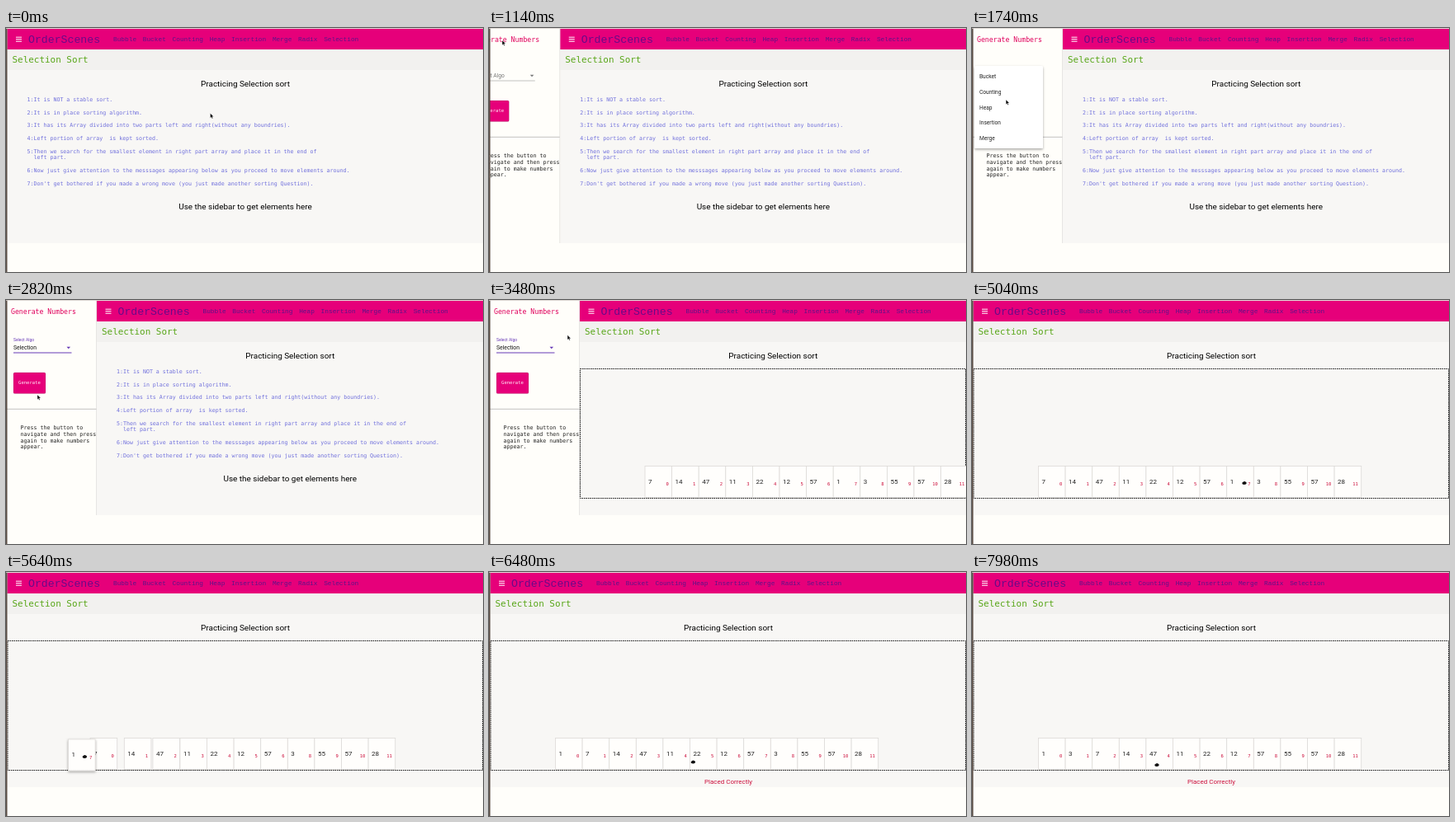
Write an HTML page that moves like this. It is 578x296 px and loops after 8000 ms.

```html
<!DOCTYPE html>
<html lang="en">
<head>
<meta charset="utf-8">
<title>Selection Sort</title>
<style>
html, body { margin: 0; width: 100%; height: 100%; overflow: hidden; background: #fffefa; }
svg { display: block; width: 578px; height: 296px; }
text { white-space: pre; }
.ui { font-family: Roboto, sans-serif; }
.mono { font-family: "DejaVu Sans Mono", monospace; }
.bar { font-family: "Liberation Mono", monospace; }
</style>
</head>
<body>
<svg id="stage" viewBox="0 0 578 296"></svg>
<script>
const LOOP = 8000, SIDE = 108.5, CELL = 32.6, ROW = 80.5, SETTLE = 250;
const PINK = '#e6007a', PURPLE = '#673ab7', RED = '#cc0f3c';
const MENU_OPEN = 1022, MENU_CLOSE = 3700, SELECT = 1480, PICK = 2020, GENERATE = 3180;
const values = [7, 14, 47, 11, 22, 12, 57, 1, 3, 55, 57, 28];
const names = ['Bubble', 'Bucket', 'Counting', 'Heap', 'Insertion', 'Merge', 'Radix', 'Selection'];
const drags = [
  { from: 7, to: 0, t0: 5160, t1: 5620 },
  { from: 8, to: 1, t0: 6840, t1: 7300 }
];
// time, x, y of the pointer
const path = [
  [0, 247.5, 103.5], [330, 247.5, 103.5], [960, 15, 14], [1150, 16, 15], [1450, 45, 57],
  [1580, 45, 58], [1960, 35, 133], [2260, 35, 133], [2820, 38, 115], [3060, 34, 103],
  [3220, 34, 103], [3640, 124, 14], [3720, 124, 14], [3900, 134, 41.5], [4500, 322, 196],
  [4780, 322, 196], [5040, 330, 222], [5160, 330, 222], [5620, 95, 224], [6360, 247, 230.5],
  [6470, 247, 230.5], [6800, 352, 228], [6840, 352, 228], [7300, 128, 230], [7360, 128, 230],
  [7980, 224, 234], [8000, 224, 234]
];

const clamp = p => Math.max(0, Math.min(1, p));
const smooth = p => p * p * (3 - 2 * p);
// cubic-bezier(.25, .8, .25, 1)
function ease(p) {
  p = clamp(p);
  let lo = 0, hi = 1;
  for (let i = 0; i < 20; i++) {
    const u = (lo + hi) / 2;
    if (.75 * u * (1 - u) + u ** 3 < p) lo = u; else hi = u;
  }
  return 2.4 * lo * (1 - lo) ** 2 + 3 * (1 - lo) * lo * lo + lo ** 3;
}

const text = (x, y, size, fill, str, cls = 'mono', more = '') =>
  `<text x="${x}" y="${y}" font-size="${size}" fill="${fill}" class="${cls}" ${more}>${str}</text>`;
const rect = (x, y, w, h, fill, more = '') =>
  `<rect x="${x}" y="${y}" width="${w}" height="${h}" fill="${fill}" ${more}/>`;
const mid = 'text-anchor="middle"';

let navX = 130;
const nav = names.map(n => {
  const item = text(navX, 16, 7.8, '#5a1488', n, 'bar');
  navX += n.length * 4.68 + 7.7;
  return item;
}).join('');

const rules = [
  [89, '1:It is NOT a stable sort.'],
  [104.7, '2:It is in place sorting algorithm.'],
  [120.3, '3:It has its Array divided into two parts left and right(without any boundries).'],
  [136, '4:Left portion of array  is kept sorted.'],
  [151.6, '5:Then we search for the smallest element in right part array and place it in the end of'],
  [159.4, '  left part.'],
  [175.2, '6:Now just give attention to the messsages appearing below as you proceed to move elements around.'],
  [190.9, "7:Don't get bothered if you made a wrong move (you just made another sorting Question)."]
].map(([y, s]) => text(25.5, y, 6.635, '#7070dc', s)).join('');

const help = ['Press the button to', 'navigate and then press', 'again to make numbers', 'appear.']
  .map((s, i) => text(17.5, 157 + i * 7.8, 6.64, '#222', s)).join('');

const cell = `<g class="cell">${rect(0, 201.5, CELL, 38, '#fffefc', 'stroke="#dcdad8" stroke-width=".8"')}
  ${text(4, 223, 8, '#222', '', 'ui')}${text(28.8, 225.3, 5.5, RED, '', 'mono', 'text-anchor="end"')}</g>`;

document.getElementById('stage').innerHTML = `
<defs>
  <clipPath id="clip">${rect(3, 46, 83, 100, '#fff')}</clipPath>
  <filter id="shadow" x="-30%" y="-30%" width="160%" height="160%">
    <feDropShadow dx="0" dy="1.5" stdDeviation="1.5" flood-opacity=".35"/></filter>
</defs>
${rect(0, 0, 578, 296, '#fffefa')}
<g id="page">
  ${rect(1.5, 1, 578, 25, PINK)}${rect(1.5, 26, 578, 25, '#f2f1ef')}${rect(1.5, 51, 578, 210, '#f8f7f5')}
  <path d="M12 11.2h7M12 13.7h7M12 16.2h7" stroke="#fff" stroke-width="1"/>
  ${text(27, 18, 13.2, '#6a0a88', 'OrderScenes', 'bar')}${nav}
  ${text(7.5, 42.3, 10.95, '#58a618', 'Selection Sort')}
  <g id="rules">${rules}</g>
</g>
<g id="center">
  ${text(290, 70.5, 9.95, '#000', 'Practicing Selection sort', 'ui', mid)}
  ${text(290, 219.8, 9.95, '#000', 'Use the sidebar to get elements here', 'ui', mid + ' id="hint"')}
  ${text(290, 256.7, 7.97, RED, 'Placed Correctly', 'ui', mid + ' id="placed"')}
</g>
<g id="board">
  ${rect(2, 83.5, 575.5, 157, 'none', 'id="zone" stroke="#222" stroke-dasharray="1.6 .9"')}
  <g id="row">${cell.repeat(13)}</g>
</g>
<g id="side">
  ${rect(0, 0, SIDE + 1, 296, '#fffefa')}
  <path d="M109.5 0V261" stroke="#dddbd8" stroke-width=".7"/>
  <path d="M1 132.3H109.5" stroke="#bbb" stroke-width=".9"/>
  ${text(6, 16.6, 8.2, '#e0005c', 'Generate Numbers')}
  ${text(9, 60, 6.7, '#777', 'Select Algo', 'ui', 'id="label"')}
  ${text(9, 60, 6.8, '#111', 'Selection', 'ui', 'id="value"')}
  <path id="caret" d="M73.5 56.8h4.6l-2.3 2.4z"/>
  <path id="line" d="M9 64H79.5"/>
  ${rect(9, 88, 39, 25.5, PINK, 'rx="1.6" stroke="#0003" stroke-width=".5"')}
  ${text(28.5, 102.2, 5.6, '#ffe6f4', 'Generate', 'mono', mid)}
  ${help}
  <g id="panel">${rect(3, 46, 83, 100, '#fff', 'rx="1.5" filter="url(#shadow)"')}
    <g clip-path="url(#clip)"><g id="options">
      ${rect(3, 46 + 18.75 * 7, 83, 18.75, '#f0f0f0')}
      ${names.map((n, i) => text(9, 57.8 + i * 18.75, 6.6, '#222', n, 'ui')).join('')}
    </g></g>
  </g>
</g>
${rect(0, 0, 1.5, 296, '#5b4d45')}${rect(0, 0, 578, .8, '#d8d0cc')}
<g id="status">${rect(0, 289, 36, 7, '#f1f0ee')}${text(2, 294.3, 4.6, '#999', 'localhost:4200', 'ui')}</g>
<g id="pointer">
  <path d="M0 0V5.7L1.3 4.5 2.2 6.5 3.2 6 2.3 4.1H4.1Z" fill="#000" stroke="#fff" stroke-width=".35"/>
  <path d="M-2.6 .3Q-2.7-1-1.6-1Q-1.2-2.1-.3-1.8Q.7-2.3 1.3-1.5Q2.7-1.5 2.7 .2Q2.6 2-.1 2T-2.6 .3Z" fill="#111"/>
</g>`;

const $ = id => document.getElementById(id);
const cells = [...document.querySelectorAll('.cell')];
const preview = cells.pop();
preview.setAttribute('filter', 'url(#shadow)');
const [arrow, fist] = $('pointer').children;
const move = (el, x, y = 0) => el.setAttribute('transform', `translate(${x} ${y})`);
const show = (el, on) => { el.style.display = on ? '' : 'none'; };
const dragged = t => drags.find(d => t >= d.t0 && t < d.t1 + SETTLE);

function pointerAt(t) {
  let i = 1;
  while (i < path.length - 1 && t > path[i][0]) i++;
  const [t0, x0, y0] = path[i - 1], [t1, x1, y1] = path[i];
  const p = clamp((t - t0) / (t1 - t0));
  const q = drags.some(d => d.t0 === t0) ? p : smooth(p);
  return [x0 + (x1 - x0) * q, y0 + (y1 - y0) * q];
}

function fill(el, value, index) {
  el.children[1].textContent = value;
  el.children[2].textContent = index;
}

function drawRow(t) {
  const order = [...values];
  for (const d of drags)
    if (t >= d.t1 + SETTLE) order.splice(d.to, 0, ...order.splice(d.from, 1));
  const d = dragged(t);
  cells.forEach((el, i) => {
    let x = ROW + i * CELL;
    if (d && i >= d.to && i < d.from) {
      // a neighbour steps aside once the pointer enters it
      const start = pointerAt(d.t0)[0], end = pointerAt(d.t1)[0];
      const cross = d.t0 + (start - x - CELL) / (start - end) * (d.t1 - d.t0);
      x += CELL * ease((t - cross) / SETTLE);
    }
    fill(el, order[i], i);
    move(el, x);
    show(el, !d || i !== d.from);
  });
  show(preview, d);
  if (!d) return;
  const [x0, y0] = pointerAt(d.t0), [x, y] = pointerAt(Math.min(t, d.t1));
  const home = ROW + d.from * CELL, goal = ROW + d.to * CELL;
  const k = ease((t - d.t1) / SETTLE), px = home + x - x0;
  fill(preview, order[d.from], d.from);
  move(preview, px + (goal - px) * k, (y - y0) * (1 - k));
}

function drawSelect(t) {
  const up = ease((t - SELECT) / 250), on = t >= SELECT;
  const tone = on ? PURPLE : '#777';
  $('label').setAttribute('y', 60 - 9.8 * up);
  $('label').setAttribute('font-size', 6.7 - 1.7 * up);
  $('label').setAttribute('fill', tone);
  $('caret').setAttribute('fill', tone);
  $('line').setAttribute('stroke', on ? PURPLE : '#999');
  $('line').setAttribute('stroke-width', on ? 1.1 : .6);
  show($('value'), t >= PICK);
  const grow = clamp((t - SELECT) / 120);
  show($('panel'), on && t < PICK + 100);
  $('panel').setAttribute('transform', `translate(0 ${58 * (1 - grow)}) scale(1 ${grow})`);
  $('panel').setAttribute('opacity', grow * (1 - clamp((t - PICK) / 100)));
  move($('options'), 0, -50 * smooth(clamp((t - 1660) / 220)));
}

function draw(now) {
  const t = now % LOOP;
  const s = SIDE * (ease((t - MENU_OPEN) / 400) - ease((t - MENU_CLOSE) / 400));
  move($('page'), s);
  move($('center'), s / 2);
  move($('side'), s - SIDE);
  show($('side'), s > .05);
  move($('row'), s);
  $('zone').setAttribute('x', 2 + s);
  $('zone').setAttribute('width', 575.5 - s);
  const ready = t >= GENERATE;
  show($('rules'), !ready);
  show($('hint'), !ready);
  show($('board'), ready);
  show($('placed'), t >= drags[0].t1 + SETTLE);
  show($('status'), t >= 3780 && t < 4300);
  drawSelect(t);
  drawRow(t);

  const [x, y] = pointerAt(t), grab = t > 4500 && y > 201;
  move($('pointer'), x, y);
  show(arrow, !grab);
  show(fist, grab);
  requestAnimationFrame(() => draw(performance.now()));
}
draw(performance.now());
</script>
</body>
</html>
```
